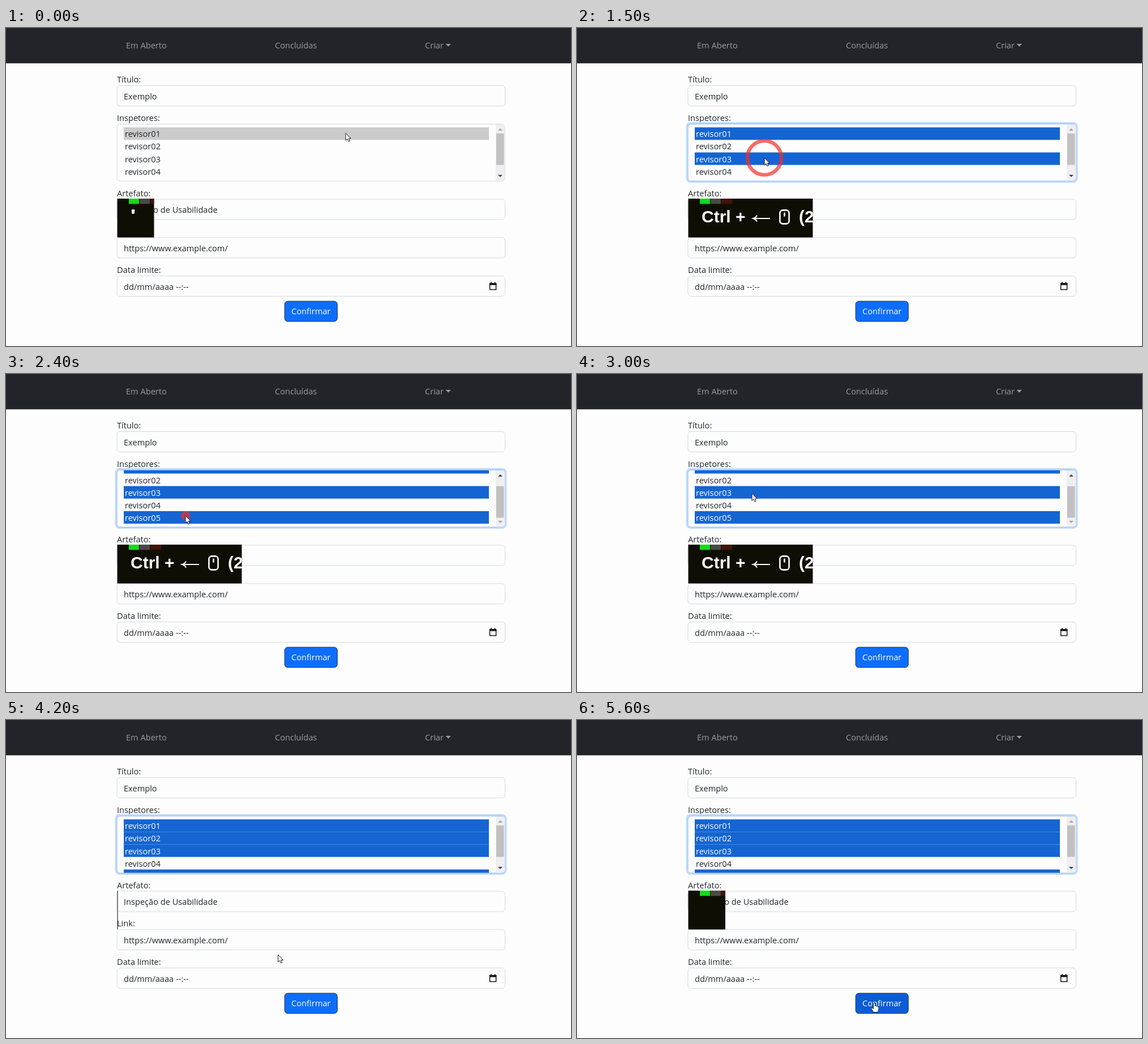
An HTML page for the animation above (5700 ms loop, 998x561 px).

```html
<!DOCTYPE html>
<html lang="pt-BR">
<head>
<meta charset="utf-8">
<title>Criar</title>
<style>
  html, body { margin: 0; width: 100%; height: 100%; overflow: hidden; background: #fdfdfd; }
  svg { display: block; width: 998px; height: 561px; }
  text { font-family: "Open Sans", "Noto Sans", sans-serif; font-size: 14.6px; fill: #212529; }
  .nav text { fill: #9b9da0; }
  .box { fill: #fdfdfd; stroke: #d5d9df; }
  .row rect { fill: none; }
  .row.idle rect { fill: #cbcbcb; }
  .row.on rect { fill: #1465d2; }
  .row.on text { fill: #fff; }
  #list.focus .box { stroke: #8fbcfb; }
  #glow { fill: #c2dafc; visibility: hidden; }
  #list.focus #glow { visibility: visible; }
  #button rect { fill: #0d6efd; stroke: #142b52; }
  #button.hover rect { fill: #0b5dd6; }
  #button text { fill: #fff; }
  #keys text { font: bold 30px "Liberation Sans", Arial, sans-serif; fill: #fff; }
  .line { fill: none; stroke: #fff; stroke-width: 2.6; }
</style>
</head>
<body>
<svg viewBox="0 0 998 561">
  <defs>
    <clipPath id="listClip"><rect x="196.5" y="170" width="685" height="99.5" rx="5"/></clipPath>
    <clipPath id="keysClip"><rect id="keysWidth" x="196.5" y="301" width="65" height="68.5"/></clipPath>
    <g id="mouse">
      <rect class="line" x="1.4" y="1.4" width="16.2" height="24" rx="5"/>
      <path class="line" d="M9.5 5.5V12.5"/>
    </g>
  </defs>

  <g class="nav">
    <rect width="998" height="62.3" fill="#212529"/>
    <text x="212" y="36">Em Aberto</text>
    <text x="475" y="36">Concluídas</text>
    <text x="740" y="36">Criar</text>
    <path d="M776.5 28h9.4l-4.7 4.7z" fill="#9b9da0"/>
  </g>

  <g id="form"></g>

  <g id="list">
    <rect id="glow" x="192.5" y="166" width="692" height="107" rx="8"/>
    <rect class="box" x="196" y="169.5" width="685.5" height="100.5" rx="5.5"/>
    <g clip-path="url(#listClip)">
      <g id="rows"></g>
      <rect x="865" y="170" width="17" height="100" fill="#efeff1"/>
      <rect id="thumb" x="866" y="186" width="13.5" height="55.5" fill="#c1c1c2"/>
      <path id="up" d="M869 181h8l-4-4z"/>
      <path id="down" d="M869 259h8l-4 4z"/>
    </g>
  </g>

  <path d="M854.6 450.7h11v10.8h-11z" fill="none" stroke="#111" stroke-width="1.5"/>
  <path d="M854 450h12.3v3.4h-12.3zM856 448.2h1.8v2h-1.8zM862.6 448.2h1.8v2h-1.8z" fill="#111"/>

  <g id="button">
    <rect x="492.2" y="482" width="93" height="35.7" rx="5.5"/>
    <text x="538.7" y="505.4" text-anchor="middle">Confirmar</text>
  </g>

  <g id="keys" clip-path="url(#keysClip)">
    <rect x="196" y="301" width="320" height="69" fill="#0f0e05"/>
    <rect x="217" y="301" width="18" height="9.3" fill="#12dc1b"/>
    <rect id="lamp" x="236" y="301" width="18" height="9.3"/>
    <rect x="255" y="301" width="19" height="9.3" fill="#431407"/>
    <path id="speck" d="M222 320h5v6q0 2-2.5 2t-2.5-2z" fill="#fff"/>
    <g id="wheel">
      <use href="#mouse" x="228" y="320"/>
      <path d="M267.5 321h24l-12 22z" fill="#fff"/>
      <text x="295" y="343">;</text>
    </g>
    <g id="combo">
      <text x="220" y="343">Ctrl +</text>
      <path class="line" style="stroke-width:2" d="M341 336H312M318 330.5q-2 4-7 5.500q5 1.500 7 5.500"/>
      <use href="#mouse" x="357" y="320"/>
      <text x="392" y="343">(2)</text>
    </g>
  </g>

  <g id="rings" fill="none"></g>

  <path id="arrow" d="M0 0V13L3 10.300L5 14.800L7.200 13.800L5.300 9.500H9.200Z" fill="#fff" stroke="#1b1c2c"/>
  <path id="hand" d="M-1.500 1.500Q0-1 1.500 1.500V6Q3 4.800 4 6.500Q5.500 5.500 6.300 7.200Q8 6.800 8 9V12L6.300 17H-1.200L-5 11Q-5.500 8.800-3.300 9.500L-1.500 11Z" fill="#fff" stroke="#1b1c2c"/>
</svg>

<script>
const LOOP = 5700, STEP = 100;
const $ = id => document.getElementById(id);

const field = (y, label, value) => `
  <text x="196" y="${y - 5.500}">${label}</text>
  <rect class="box" x="196" y="${y}" width="685.5" height="36" rx="5.5"/>
  <text x="208" y="${y + 24.200}">${value}</text>`;

$('form').innerHTML =
  field(101.5, 'Título:', 'Exemplo') +
  '<text x="196" y="164">Inspetores:</text>' +
  field(302, 'Artefato:', 'Inspeção de Usabilidade') +
  field(369.7, 'Link:', 'https://www.example.com/') +
  field(437.4, 'Data limite:', 'dd/mm/aaaa --:--');

// When each option becomes selected
const picked = [600, 1300, 1300, Infinity, 2400];
picked[1] = 3600;
$('rows').innerHTML = picked.map((_, i) => {
  const y = 175.3 + 22.1 * i;
  return `<g class="row"><rect x="208" y="${y}" width="645" height="22.1"/>
    <text x="210" y="${y + 17}">revisor0${i + 1}</text></g>`;
}).join('');
const rows = [...document.querySelectorAll('.row')];

// Pointer path: time, x, y
const path = [
  [0, 600, 185.5], [700, 600, 185.5], [900, 329.5, 237.5], [1100, 331, 229],
  [1800, 331, 229], [1900, 320, 230.5], [2200, 317, 250], [2500, 317, 250],
  [3000, 309, 210.5], [3400, 316, 179], [3600, 316, 179], [3700, 317.5, 186.5],
  [4200, 480.5, 414], [4600, 518, 500], [4800, 527, 506], [5000, 527, 506],
  [5400, 525, 498.5], [LOOP, 525, 498.5]
];

// Key display: time, width, label mode
const captions = [
  [0, 65, 'speck'], [1300, 220, 'combo'], [1800, 313, 'wheel'], [2400, 220, 'combo'],
  [3600, 266, 'combo'], [4100, 1, ''], [4400, 65.5, '']
];

// Expanding marks: start, x, y, half ring for the wheel
const marks = [
  [600, 599, 185], [1300, 331, 229], [1800, 331, 229.5, true],
  [2400, 317, 250], [3600, 316, 179]
];

function pointerAt(t) {
  const i = path.findIndex(p => p[0] > t);
  const [t0, x0, y0] = path[i - 1], [t1, x1, y1] = path[i];
  const k = (t - t0) / (t1 - t0);
  return [x0 + (x1 - x0) * k, y0 + (y1 - y0) * k];
}

function ring([start, x, y, half], t) {
  const n = (t - start) / STEP;
  if (n < 0 || n > 3) return '';
  const r = 3.5 + 13.3 * n + (half ? 3.5 : 0);
  const look = `stroke-width="${9.5 - 1.5 * n + (half ? 1 : 0)}" stroke="${half ? '#a8a8a8' : '#f22f27'}" stroke-opacity="${half ? .9 : .7}"`;
  return half
    ? `<path d="M${x - r} ${y}A${r} ${r} 0 0 0 ${x + r} ${y}" ${look}/>`
    : `<circle cx="${x}" cy="${y}" r="${r}" ${look}/>`;
}

const show = (id, on) => $(id).setAttribute('visibility', on ? 'visible' : 'hidden');

function draw(t) {
  const scrolled = t >= 1800 && t < 3700;
  rows.forEach((row, i) => {
    row.classList.toggle('on', t >= picked[i]);
    row.classList.toggle('idle', i === 0 && t < picked[0]);
  });
  $('list').classList.toggle('focus', t >= 600);
  $('rows').setAttribute('transform', `translate(0 ${scrolled ? -21.8 : 0})`);
  $('thumb').setAttribute('y', scrolled ? 198 : 186);
  $('up').setAttribute('fill', scrolled ? '#45464a' : '#a3a3a3');
  $('down').setAttribute('fill', scrolled ? '#a3a3a3' : '#45464a');

  const [, width, mode] = captions.filter(c => c[0] <= t).pop();
  $('keysWidth').setAttribute('width', width);
  show('speck', mode === 'speck');
  show('wheel', mode === 'wheel');
  show('combo', mode === 'wheel' || mode === 'combo');
  $('combo').setAttribute('transform', `translate(${mode === 'wheel' ? 93.5 : 0} 0)`);
  $('lamp').setAttribute('fill', t === 3700 ? '#fff' : '#4b4b45');

  $('rings').innerHTML = marks.map(m => ring(m, t)).join('');

  const [x, y] = pointerAt(t);
  const hover = x > 492 && x < 585 && y > 482 && y < 518;
  $('button').classList.toggle('hover', hover);
  show('arrow', !hover);
  show('hand', hover);
  $(hover ? 'hand' : 'arrow').setAttribute('transform', `translate(${x} ${y})`);
}

const begin = performance.now();
let last = -1;
function tick() {
  const t = Math.floor((performance.now() - begin) % LOOP / STEP) * STEP;
  if (t !== last) draw(last = t);
  requestAnimationFrame(tick);
}
tick();
</script>
</body>
</html>
```
